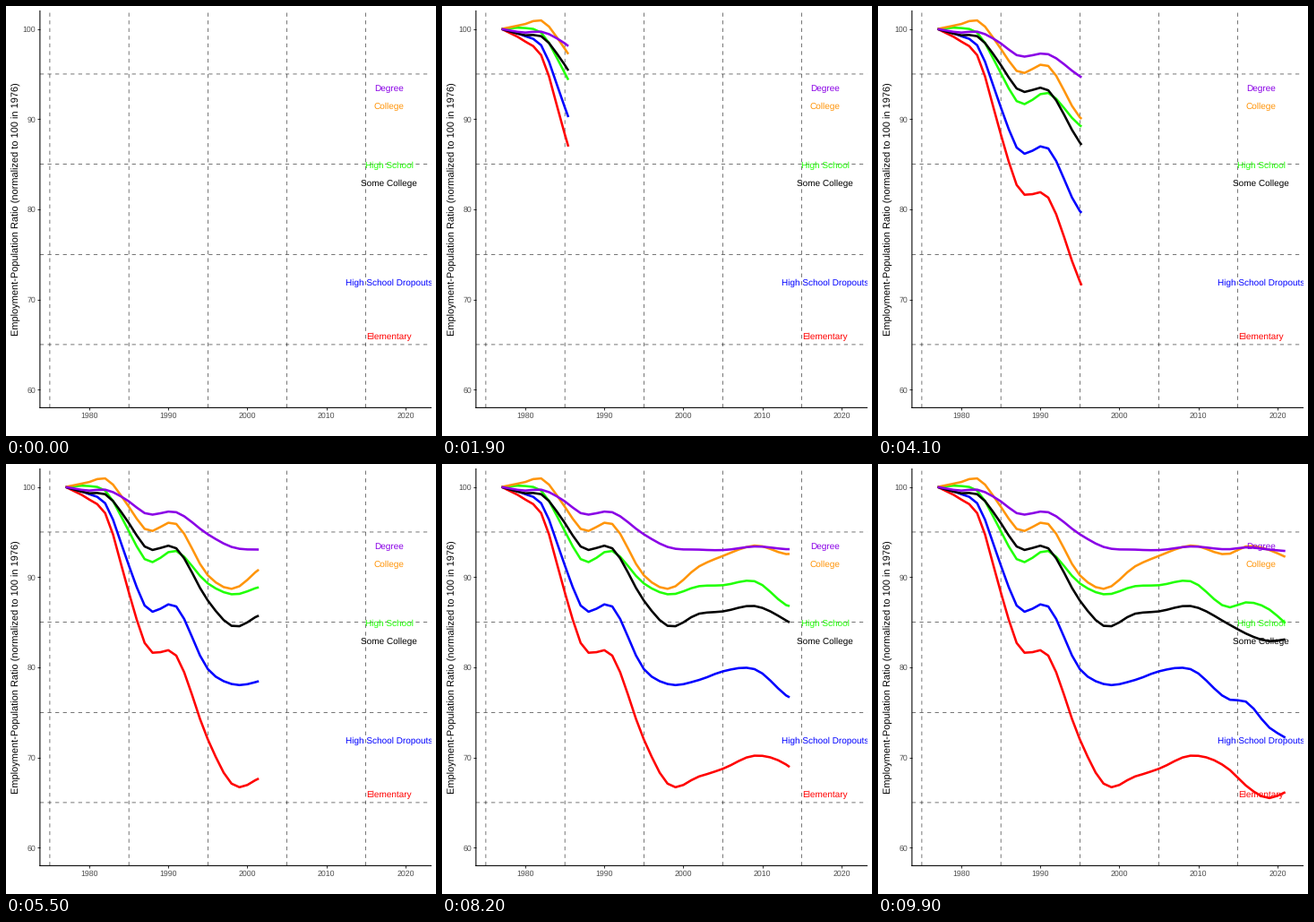
Recreate the animation shown at these times as a matplotlib script. Size 480 by 480 pixels, loop 10000 ms.

```python
import numpy as np
import matplotlib.pyplot as plt
from matplotlib.animation import FuncAnimation

plt.rcParams.update({"font.family": "Liberation Sans", "text.hinting": "none"})

SIZE, DPI = 480, 72  # one point equals one pixel
FRAMES, INTERVAL = 100, 100
LEFT, RIGHT, TOP, BOTTOM = 37.9, 474.5, 5.5, 448.4
FIRST, LAST = 1977, 2021
YEARS = np.arange(FIRST, LAST + 1)
STROKE = 1.07

# Turning points shared by all groups; every curve starts at 100.
KNOTS = [FIRST, 1980, 1982, 1985, 1987, 1991, 1995, 1998,
         2002, 2005, 2009, 2014, 2016, 2019, LAST]


def smooth(x, knots, values):
    """Cubic Hermite curve through the knots."""
    knots, values = np.array(knots, float), np.array(values, float)
    slope = np.gradient(values, knots)
    i = np.clip(np.searchsorted(knots, x, side="right") - 1, 0, len(knots) - 2)
    h = knots[i + 1] - knots[i]
    t = (x - knots[i]) / h
    ease = t * t * (3 - 2 * t)
    return (values[i] + ease * (values[i + 1] - values[i])
            + h * t * (1 - t) * ((1 - t) * slope[i] - t * slope[i + 1]))


fig = plt.figure(figsize=(SIZE / DPI, SIZE / DPI), dpi=DPI, facecolor="white")
ax = fig.add_axes([LEFT / SIZE, 1 - BOTTOM / SIZE,
                   (RIGHT - LEFT) / SIZE, (BOTTOM - TOP) / SIZE])
ax.set(xlim=(1973.75, 2023.25), ylim=(58, 102),
       xticks=range(1980, 2021, 10), yticks=range(60, 101, 10))
ax.spines[["top", "right"]].set_visible(False)
for side in ("left", "bottom"):
    ax.spines[side].set(linewidth=STROKE, snap=False)
ax.tick_params(length=2.75, width=STROKE, pad=2.2, labelsize=8.8,
               color="#333333", labelcolor="#4d4d4d")
ax.tick_params(axis="x", pad=2.6)
fig.text(14.5 / SIZE, 1 - (TOP + BOTTOM) / 2 / SIZE,
         "Employment-Population Ratio (normalized to 100 in 1976)",
         size=11, rotation=90, rotation_mode="anchor",
         ha="center", va="baseline")

dashes = dict(color="black", lw=STROKE / 2, ls=(0, (8, 8)),
              dash_capstyle="butt", snap=False, zorder=1)
for level in range(65, 96, 10):
    ax.axhline(level, **dashes)
for year in range(1975, 2016, 10):
    ax.axvline(year, **dashes)

series = []


def add_series(name, color, label_y, *levels):
    line, = ax.plot([], [], color=color, lw=2.56, zorder=3,
                    solid_capstyle="butt", solid_joinstyle="round")
    label = ax.annotate(name, (2018, label_y), xytext=(-0.5, -4.1),
                        textcoords="offset points", color=color, size=9.96,
                        ha="center", va="baseline", zorder=4,
                        annotation_clip=False)
    label.set_clip_on(True)
    label.set_clip_box(ax.bbox)
    series.append((line, smooth(YEARS, KNOTS, (100,) + levels)))


add_series("Elementary", "#ff0000", 66, 98.6, 97.1, 88.3, 82.7, 81.3, 72,
           67.1, 67.9, 68.75, 70.2, 68.6, 66.9, 65.5, 66.15)
add_series("High School Dropouts", "#0000ff", 72, 99.2, 98.2, 91.3, 86.85,
           86.75, 79.8, 78.15, 78.6, 79.55, 79.8, 76.4, 76.2, 73.3, 72.2)
add_series("High School", "#21ff06", 85, 100.1, 99.6, 95.1, 92, 92.9, 89.3,
           88.1, 89, 89.1, 89.55, 86.65, 87.2, 86.4, 84.9)
add_series("Some College", "#000000", 83, 99.3, 99.2, 96, 93.4, 93.2, 87.4,
           84.6, 85.95, 86.2, 86.8, 84.7, 83.75, 82.9, 83.1)
add_series("College", "#ff950a", 91.5, 100.55, 100.95, 97.8, 95.35, 95.9,
           90.2, 88.7, 91.2, 92.35, 93.5, 92.6, 93.4, 93, 92.25)
add_series("Degree", "#8a00e6", 93.5, 99.6, 99.7, 98.4, 97.1, 97.2, 94.75,
           93.35, 93.05, 93, 93.4, 93.1, 93.3, 93.05, 92.9)


def draw(frame):
    now = FIRST + (LAST - FIRST) * frame / (FRAMES - 1)
    xs = np.append(YEARS[YEARS < now], now)
    for line, values in series:
        line.set_data(xs, np.interp(xs, YEARS, values))
    return [line for line, _ in series]


anim = FuncAnimation(fig, draw, frames=FRAMES, interval=INTERVAL,
                     repeat=True, repeat_delay=0)
plt.show()
```
